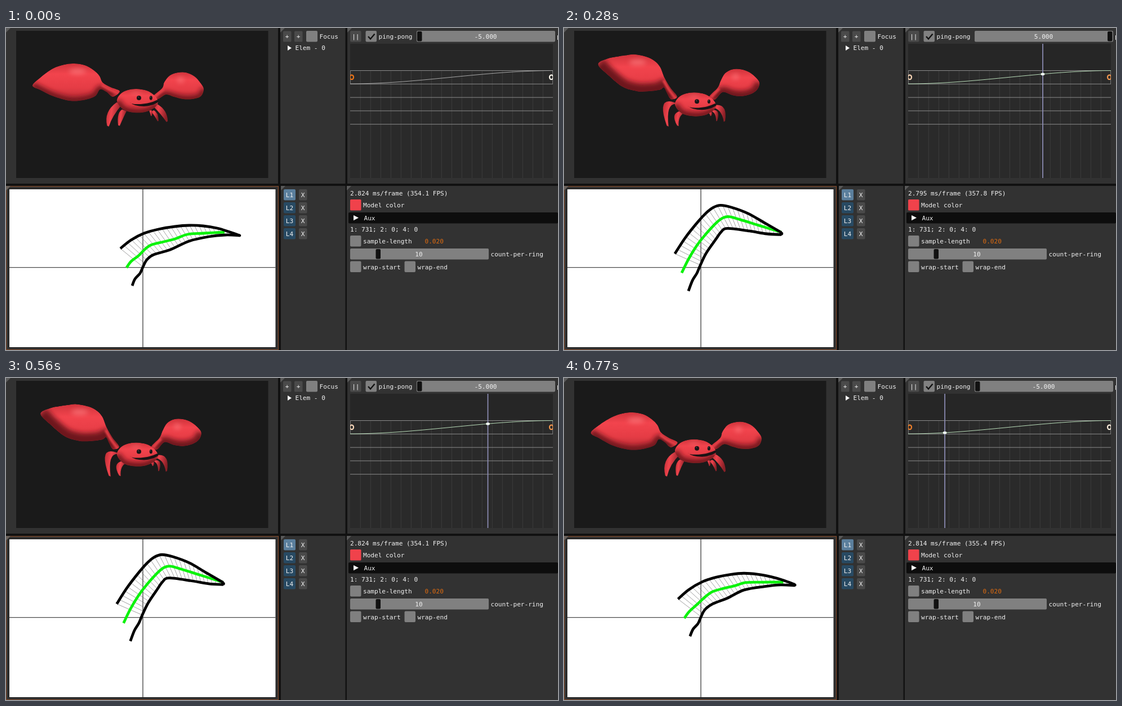
Write an HTML page that moves like this. It is 980x571 px and loops after 840 ms.

```html
<!DOCTYPE html>
<html lang="en">
<head>
<meta charset="utf-8">
<title>Crab model editor</title>
<style>
html, body { margin: 0; width: 100%; height: 100%; overflow: hidden; background: #111; }
svg { display: block; width: 980px; height: 571px; }
text { font: 11.08px "DejaVu Sans Mono", monospace; fill: #f2f2f2; white-space: pre; }
</style>
</head>
<body>
<svg id="stage" viewBox="0 0 980 571" xmlns="http://www.w3.org/2000/svg">
  <defs>
    <linearGradient id="shell" x1="0" y1="0" x2="0" y2="1">
      <stop offset="0" stop-color="#cf333b"/><stop offset=".28" stop-color="#f2444d"/>
      <stop offset=".65" stop-color="#e53c45"/><stop offset="1" stop-color="#b82b33"/>
    </linearGradient>
    <linearGradient id="leg" x1="0" y1="0" x2="1" y2=".25">
      <stop offset="0" stop-color="#b92b33"/><stop offset=".4" stop-color="#f0444d"/>
      <stop offset="1" stop-color="#8a2027"/>
    </linearGradient>
    <filter id="soft" x="-60%" y="-100%" width="220%" height="300%"><feGaussianBlur stdDeviation="4"/></filter>
    <filter id="fine" x="-60%" y="-60%" width="220%" height="220%"><feGaussianBlur stdDeviation="1.4"/></filter>
    <clipPath id="lane"><rect x="611" y="28" width="360" height="238"/></clipPath>
  </defs>
  <g id="ui"></g>
  <g id="time" clip-path="url(#lane)"></g>
  <g id="crab"></g>
  <g id="sketch"></g>
</svg>
<script>
const NS = 'http://www.w3.org/2000/svg';
const $ = id => document.getElementById(id);

function set(el, attrs) {
  for (const k in attrs) el.setAttribute(k, attrs[k]);
  return el;
}
const add = (parent, tag, attrs) => parent.appendChild(set(document.createElementNS(NS, tag), attrs));
const ui = $('ui');
const box = (x, y, width, height, fill, rx = 0) => add(ui, 'rect', { x, y, width, height, fill, rx });
const path = (parent, d, attrs) => add(parent, 'path', { d, ...attrs });
function label(x, y, str, attrs = {}) {
  const t = add(ui, 'text', { x, y, ...attrs });
  t.textContent = str;
  return t;
}
const mid = { 'text-anchor': 'middle' };

// Panels
const PANEL = '#323232', GREY = '#808080', BUTTON = '#4a4a4a';
const panels = [[0, 0, 483, 276], [487, 0, 115.5, 276], [606, 0, 374, 276],
  [0, 280, 484, 291], [488, 280, 114.5, 291], [605, 280, 375, 291]];
for (const [x, y, w, h] of panels) {
  box(x, y, w, h, PANEL);
  path(ui, `M${x} ${y}h8l-8 8z`, { fill: '#5a5a5a' });
}
box(18, 5, 447.5, 261, '#1a1a1a');
add(ui, 'rect', { x: .5, y: 280.8, width: 483, height: 289.7, fill: 'none', stroke: '#80492a', 'stroke-width': 1.2 });
box(4.5, 284.5, 475.5, 283, '#202020');
box(6, 286, 472.5, 280, '#fff');
path(ui, 'M0 280h8l-8 8z', { fill: '#6b625c' });

// Element list
for (const x of [492, 512]) {
  box(x, 5.5, 14.5, 19, BUTTON, 1.5);
  label(x + 7.2, 18.7, '+', mid);
}
box(533, 5, 20, 19.5, GREY, 2);
label(556.5, 18.7, 'Focus');
path(ui, 'M500 31l7 4.5-7 4.5z', { fill: '#fff' });
label(513.5, 39.3, 'Elem - 0');

// Layers
for (let i = 0; i < 4; i++) {
  const y = 286 + i * 23;
  box(493, y, 21, 19.5, i ? '#284a63' : '#5b7f9d', 2);
  label(503.5, y + 13.5, 'L' + (i + 1), mid);
  box(520, y, 14.5, 19.5, BUTTON, 2);
  label(527.2, y + 13.5, 'X', mid);
}

// Timeline header
box(611, 5, 19.5, 19.5, BUTTON, 2);
label(620.8, 18.7, '||', mid);
box(638.5, 5, 19.5, 19.5, GREY, 2);
path(ui, 'M643 15l4 4.5 7.5-9', { fill: 'none', stroke: '#111', 'stroke-width': 2.4 });
label(661.5, 18.7, 'ping-pong');
box(729, 5, 246, 19.5, GREY, 2);
const knob = box(730, 6, 8.5, 17.5, '#111', 2);
const speed = label(851.5, 18.7, '', mid);
label(978, 18.7, 'p');

// Settings
const frameText = label(611, 297, '');
box(611, 304, 19.5, 19.5, '#f0424b', 1.5);
label(634, 317.7, 'Model color');
box(608, 327, 372, 19.5, '#0d0d0d', 2);
path(ui, 'M617 332l9 4.6-9 4.6z', { fill: '#fff' });
label(635.5, 340.5, 'Aux');
label(611, 361, '1: 731; 2: 0; 4: 0');
box(611, 368, 19.5, 19.5, GREY, 2);
label(634, 381.7, 'sample-length');
label(743.5, 381.7, '0.020', { style: 'fill:#e06c10' });
box(611, 391, 246, 19.5, GREY, 2);
box(656.5, 392, 8.5, 17.5, '#111', 2);
label(733, 404.7, '10', mid);
label(860.5, 404.7, 'count-per-ring');
box(611, 413.5, 19.5, 19.5, GREY, 2);
label(634, 427.5, 'wrap-start');
box(707.5, 413.5, 19.5, 19.5, GREY, 2);
label(730.5, 427.5, 'wrap-end');

// Timeline
const X0 = 611, SPAN = 360;
const ease = u => u * u * (3 - 2 * u);
const laneY = u => 99 - 23.5 * ease(u);
const time = $('time');
add(time, 'rect', { x: X0, y: 28, width: SPAN, height: 238, fill: '#262626' });
add(time, 'rect', { x: X0, y: 75, width: SPAN, height: 191, fill: '#2a2a2a' });
for (let x = X0 + 18; x < 970; x += 18) path(time, `M${x + .3} 75V266`, { stroke: '#3d3d3d' });
for (let i = 0; i < 5; i++) path(time, `M611 ${75.5 + i * 23.8}h360`, { stroke: '#8c8c8c' });
path(time, 'M611.5 75.5v24M970.5 75.5v24', { stroke: '#777' });
let lane = '';
for (let i = 0; i <= 40; i++) lane += (i ? 'L' : 'M') + (X0 + 9 * i) + ' ' + laneY(i / 40).toFixed(2);
const curve = path(time, lane, { fill: 'none' });
const head = add(time, 'g', {});
path(head, 'M0 28V266', { stroke: '#8f8fb8', 'stroke-width': 1.7 });
const dot = add(head, 'ellipse', { rx: 3.4, ry: 2.3, fill: '#f2fff2' });
const ends = [613.8, 968.2].map(cx =>
  add(time, 'ellipse', { cx, cy: 87.3, rx: 3.2, ry: 3.9, fill: 'none', 'stroke-width': 2.2 }));

// Poses are keyed at three bend amounts and blended quadratically.
const KEYS = [0, .495, .923];
const points = s => s.split(' ').map(p => p.split(',').map(Number));
const shape = (...poses) => poses.map(points);
function blend(poses, w) {
  const k = KEYS.map((a, i) => KEYS.reduce((m, b, j) => i === j ? m : m * (w - b) / (a - b), 1));
  return poses[0].map((_, n) => [0, 1].map(c => k.reduce((sum, v, i) => sum + v * poses[i][n][c], 0)));
}
const str = p => p.map(v => v.toFixed(2)).join(' ');

function spline(pts, closed) {
  const n = pts.length;
  const at = i => closed ? pts[(i + n) % n] : pts[Math.max(0, Math.min(n - 1, i))];
  const lean = (p, a, b) => p.map((v, c) => v + (b[c] - a[c]) / 6);
  let d = 'M' + str(pts[0]);
  for (let i = 0; i < (closed ? n : n - 1); i++) {
    const p = at(i), q = at(i + 1);
    d += 'C' + [lean(p, at(i - 1), q), lean(q, at(i + 2), p), q].map(str).join(' ');
  }
  return d;
}

const BIG = shape(
  '47,102 62,87 83,72 103,65 121,63 140,66 156,75 166,85 172,97 186,105 202,112 190,122 178,113 167,109 158,121 137,128 113,129 84,121 61,110',
  '54,76 73,63 97,56 110,53 124,52 144,56 158,64 168,75 176,93 188,108 201,121 190,126 181,115 174,107 168,113 147,117 126,118 100,112 73,93',
  '67,56 80,49 97,46 111,45 125,43 148,47 164,54 174,65 181,84 189,102 201,121 190,126 185,116 180,104 171,107 149,109 130,107 106,97 83,76');
const SMALL = shape(
  '260,122 277,107 281,96 291,84 305,79 320,79 335,86 345,97 351,108 346,121 331,126 314,126 298,122 284,118 270,126',
  '258,122 275,106 280,94 288,81 302,75 316,75 331,80 343,91 349,101 345,113 333,121 316,123 300,120 283,115 269,127',
  '258,122 270,107 276,94 284,80 297,72 313,72 328,78 340,87 345,95 341,106 329,114 312,119 296,118 280,113 267,127');
const BODY = points('197,130 203,117 216,110 232,108 250,111 262,118 269,127 269,135 261,143 247,149 228,150 209,145');

// Each leg: half width, then root, bend and tip for the three poses.
const LEGS = [
  [2, shape('256,146 259,149 258,156', '257,148 261,149 260,156', '260,150 263,152 261,156')],
  [2.6, shape('260,147 267,152 270,165', '262,145 273,147 271,165', '264,149 274,148 271,165')],
  [4, shape('265,137 281,149 286,166', '265,138 283,141 285,166', '266,140 287,136 285,165')],
  [5, shape('201,134 181,152 181,174', '201,133 176,133 183,174', '200,135 168,118 185,174')],
  [4.2, shape('210,146 203,153 200.5,173', '210,147 198,153 201.5,173', '211,150 193,154 203,174')]];

const crab = $('crab');
const legs = LEGS.map(([half, poses]) => ({ half, poses, el: path(crab, '', { fill: 'url(#leg)' }) }));

let clips = 0;
function solid() {
  const id = 'cut' + clips++;
  const cut = path(add(document.querySelector('defs'), 'clipPath', { id }), '', {});
  const g = add(crab, 'g', { 'clip-path': `url(#${id})` });
  const fill = path(g, '', { fill: 'url(#shell)' });
  const shade = path(g, '', { fill: 'none', stroke: '#6e171d', filter: 'url(#soft)' });
  const arm = path(g, '', { fill: 'none', stroke: '#e33c45', 'stroke-width': 5, filter: 'url(#fine)' });
  const glow = add(g, 'ellipse', { fill: '#ff8587', opacity: .6, filter: 'url(#soft)' });
  return { cut, fill, shade, arm, glow };
}
function pose(s, pts, under, width, [cx, cy, rx, ry], arm) {
  const d = spline(pts, true);
  set(s.cut, { d });
  set(s.fill, { d });
  set(s.shade, { d: spline(under), 'stroke-width': width });
  set(s.glow, { cx, cy, rx, ry });
  if (arm) set(s.arm, { d: spline(arm) });
}
const small = solid(), big = solid(), body = solid();
const face = add(crab, 'g', {});
path(face, 'M219.5 131.5Q222 134.5 228 135Q252 136 268.5 127.5Q271.5 129 269.5 132Q260 138 245 139Q227 139 219.5 131.5Z', { fill: '#191315' });
for (const [cx, rx, ry] of [[236, 4, 4], [257.3, 2.6, 3.7]]) {
  add(face, 'ellipse', { cx, cy: 124, rx, ry, fill: '#1b1517' });
  add(face, 'circle', { cx: cx - .8, cy: 122.5, r: .8, fill: '#6a6265' });
}

function drawCrab(w) {
  for (const { half, poses, el } of legs) {
    const [a, b, c] = blend(poses, w);
    const len = Math.hypot(c[0] - a[0], c[1] - a[1]);
    const n = [(a[1] - c[1]) / len * half, (c[0] - a[0]) / len * half];
    const off = (p, m) => str([p[0] + n[0] * m, p[1] + n[1] * m]);
    set(el, { d: `M${off(a, 1)}Q${off(b, 1.7)} ${off(c, .35)}L${off(c, -.35)}Q${off(b, -1.7)} ${off(a, -1)}Z` });
  }
  const p = blend(BIG, w), q = blend(SMALL, w), dy = 8.6 * w;
  const b = BODY.map(([x, y]) => [x, y + dy]);
  const shift = (list, x, y) => list.map(v => [v[0] + x, v[1] + y]);
  pose(big, p, [...p.slice(11), p[0]], 13 + 20 * w, [p[4][0] + 6, p[4][1] + 14, 15, 5], shift(p.slice(8, 11), -2, 4));
  pose(small, q, q.slice(8), 11 + 9 * w, [q[4][0] + 5, q[4][1] + 13, 6, 5], shift(q.slice(0, 2), 3, 1));
  pose(body, b, [b[0], ...b.slice(7).reverse()], 12, [231, 115 + dy, 10, 2], null);
  set(face, { transform: `translate(0 ${dy})` });
}

// Cross-section sketch
const TOP = shape(
  '203,391 222,376 245,364 270,357 300,352 325,350 350,351 375,355 395,361 415,368',
  '199,397 218,373 243,350 262,337 277,330 293,327 315,331 340,339 365,349 392,362',
  '195,403 213,371 231,340 243,321 255,309 267,304 285,307 318,320 350,343 384,365');
const LOW = shape(
  '224,457 229,445 238,435 243,424 250,411 262,402 292,393 325,378 360,370 390,367 415,368',
  '222,463 229,447 237,436 243,422 251,406 270,387 283,374 299,364 340,365 365,366 392,367',
  '220,469 227,448 235,433 241,419 254,392 268,362 275,352 285,348 320,355 360,364 384,366');
const MID = shape(
  '214,425 222,414 235,404 246,393 257,385 280,379 300,374 322,366 350,364 388,362',
  '211,431 222,413 237,392 252,377 275,356 290,348 302,346 320,348 350,354 390,362',
  '207,437 220,406 233,382 245,361 262,338 272,329 283,327 305,334 340,347 380,362');
const sketch = $('sketch');
path(sketch, 'M243 286V566M6 424.6H478.5', { stroke: '#4a4a4a', 'stroke-width': 1.4 });
const ribs = path(sketch, '', { stroke: '#777', 'stroke-width': .7 });
const stroke = (color, width) => path(sketch, '', { fill: 'none', stroke: color, 'stroke-width': width, 'stroke-linejoin': 'round' });
const green = stroke('#0df20d', 4.8), top_ = stroke('#000', 4.8), low = stroke('#000', 4.8);
const tip = add(sketch, 'circle', { r: 3 });

function drawSketch(w) {
  const a = blend(TOP, w), b = blend(LOW, w);
  set(top_, { d: spline(a) });
  set(low, { d: spline(b) });
  set(green, { d: spline(blend(MID, w)) });
  const [x, y] = a[9];
  set(tip, { cx: x, cy: (y + b[10][1]) / 2, r: 2.3 + 4 * w * (1 - w) });
  const n = 27, tail = 39 + 16 * w;
  const la = top_.getTotalLength(), lb = low.getTotalLength() - tail;
  let d = '';
  for (let i = 0; i < n; i++) {
    const p = top_.getPointAtLength(la * i / n), q = low.getPointAtLength(tail + lb * i / n);
    d += 'M' + str([p.x, p.y]) + 'L' + str([q.x, q.y]);
  }
  set(ribs, { d });
}

const STEP = 70, COUNT = 12;
const COST = [2.824, 2.79, 2.757, 2.755, 2.795, 2.835, 2.832, 2.83, 2.824, 2.818, 2.816, 2.814];
const mix = u => `rgb(${[[240, 255], [118, 250], [24, 240]].map(([a, b]) => Math.round(a + (b - a) * u))})`;

function draw(k) {
  const x = k < 7 ? 608.8 + 60.3 * k : 915.3 - 59.8 * (k - 7);
  const u = Math.max(0, Math.min(1, (x - X0) / SPAN)), w = ease(u);
  const inside = k % 6 !== 0, ahead = k > 0 && k < 7;
  drawCrab(w);
  drawSketch(w);
  set(head, { transform: `translate(${x} 0)`, visibility: inside ? 'visible' : 'hidden' });
  set(dot, { cy: laneY(u) });
  set(curve, { stroke: inside ? '#b9dcb9' : '#a8a8a8' });
  set(ends[0], { stroke: mix(w) });
  set(ends[1], { stroke: mix(1 - w) });
  set(knob, { x: ahead ? 965 : 730 });
  speed.textContent = ahead ? '5.000' : '-5.000';
  frameText.textContent = `${COST[k].toFixed(3)} ms/frame (${(1000 / COST[k]).toFixed(1)} FPS)`;
}

const start = performance.now();
let shown = -1;
function tick() {
  const k = Math.floor((performance.now() - start) / STEP) % COUNT;
  if (k !== shown) draw(shown = k);
  requestAnimationFrame(tick);
}
tick();
</script>
</body>
</html>
```
